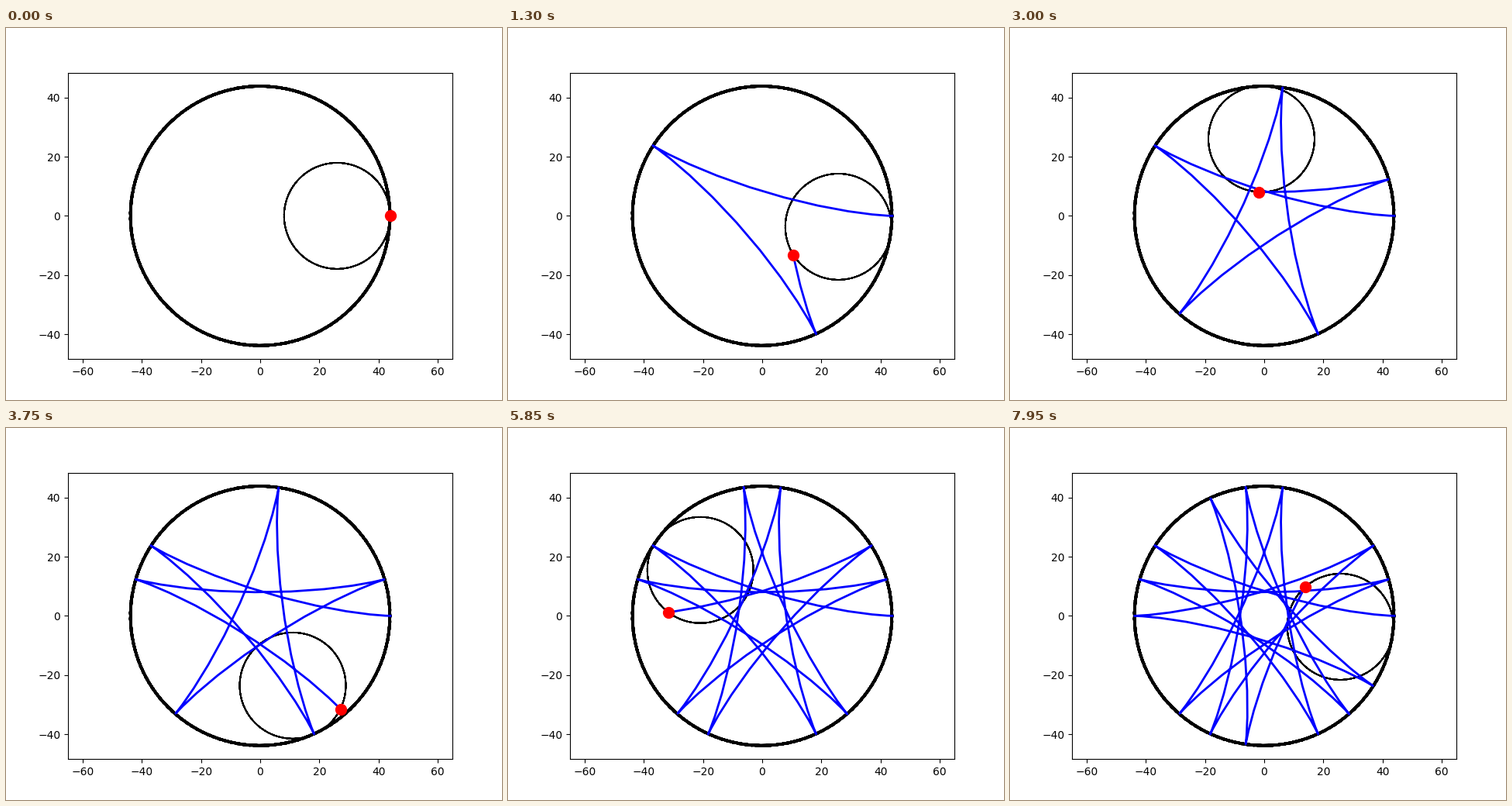
Animation of 640 by 480 pixels, one loop 8 s. Source, as a matplotlib script:

```python
import numpy as np
import matplotlib.pyplot as plt
from matplotlib.animation import FuncAnimation

R, r = 44, 18          # fixed ring and rolling circle
FRAMES, INTERVAL = 160, 50

t = np.linspace(0, 30 * np.pi, 400)
cx, cy = (R - r) * np.cos(t), (R - r) * np.sin(t)
spin = (R - r) / r * t
px, py = cx + r * np.cos(spin), cy - r * np.sin(spin)

fig, ax = plt.subplots(figsize=(6.4, 4.8), dpi=100)
ax.plot(R * np.cos(t), R * np.sin(t), "k-", lw=2)
roller, = ax.plot(cx[0] + r * np.cos(t), cy[0] + r * np.sin(t), "k-", lw=1)
trace, = ax.plot([], [], "b-", lw=2)
dot, = ax.plot(px[:1], py[:1], "ro", ms=10)
ax.axis("equal")


def update(i):
    roller.set_data(cx[i] + r * np.cos(t), cy[i] + r * np.sin(t))
    trace.set_data(px[:i + 1], py[:i + 1])
    dot.set_data(px[i:i + 1], py[i:i + 1])
    return roller, trace, dot


anim = FuncAnimation(fig, update, frames=FRAMES, interval=INTERVAL,
                     init_func=lambda: update(0), repeat=True, repeat_delay=0)
plt.show()
```
